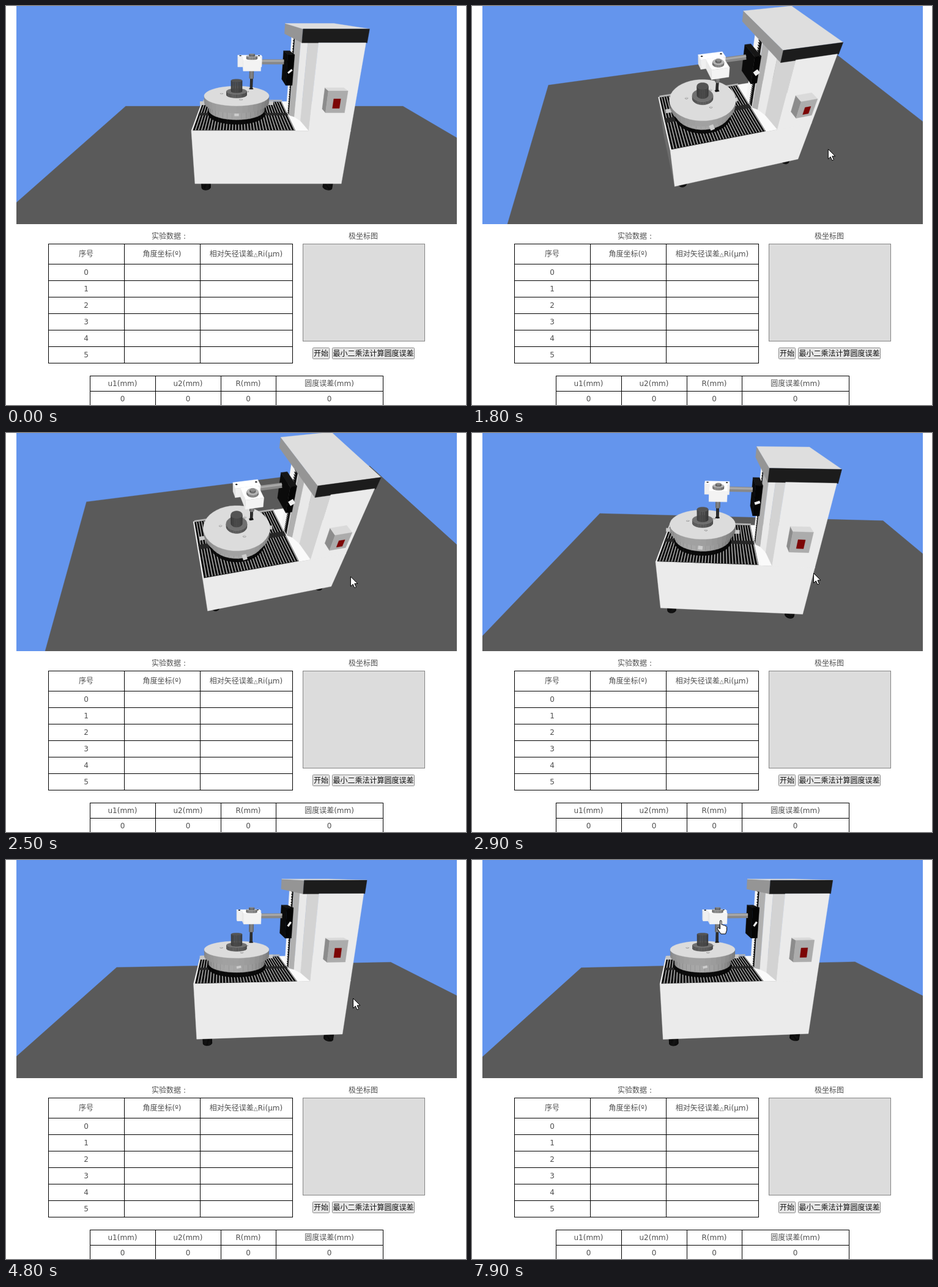
An HTML page with a canvas that plays this animation: 752x653 px, repeating every 8 s.

```html
<!DOCTYPE html>
<html lang="zh">
<head>
<meta charset="utf-8">
<style>
html, body { margin: 0; width: 100%; height: 100%; overflow: hidden; background: #fff; }
canvas { position: absolute; left: 17px; top: 0; }
svg { position: absolute; left: 0; top: 0; font: 12px "DejaVu Sans", "Noto Sans CJK SC", "Noto Sans CJK", sans-serif; text-anchor: middle; }
</style>
</head>
<body>
<svg id="page" width="752" height="653"></svg>
<canvas id="view" width="720" height="357"></canvas>
<script>
// ---------- static page ----------
let svg = '';
const label = (x, y, s, fill = '#505050') => svg += `<text x="${x}" y="${y}" fill="${fill}">${s}</text>`;
const rect = (x, y, w, h, fill, stroke, r = 0) =>
  svg += `<rect x="${x}" y="${y}" width="${w}" height="${h}" rx="${r}" fill="${fill}" stroke="${stroke}"/>`;

// Ruled table: header texts between column lines, then one line of values per row.
function table(xs, y, head, rowHeight, rows) {
  const bottom = y + head + rowHeight * rows.length, right = xs.at(-1);
  const row = (cells, base) => cells.forEach((s, i) => label((xs[i] + xs[i + 1]) / 2 - .5, base, s));
  let d = xs.map(x => `M${x} ${y - .5}V${bottom + .5}`).join('') + `M${xs[0]} ${y}H${right}`;
  rows.forEach((cells, i) => {
    const top = y + head + i * rowHeight;
    d += `M${xs[0]} ${top}H${right}`;
    row(cells, top + rowHeight / 2 + 4);
  });
  svg += `<path d="${d}M${xs[0]} ${bottom}H${right}" stroke="#000" fill="none"/>`;
  return titles => row(titles, y + head / 2 + 4);
}
function button(x, w, s) {
  rect(x, 559.5, w, 18, '#e6e6e6', '#8a8a8a', 1);
  label(x + w / 2, 573, s, '#111');
}
label(266, 381, '实验数据 :');
label(584, 381, '极坐标图');
table([69.5, 193.5, 317.5, 468.5], 389.5, 33, 27, [0, 1, 2, 3, 4, 5].map(n => [n]))(
  ['序号', '角度坐标(º)', '相对矢径误差<tspan font-size="9">△</tspan>Ri(μm)']);
table([137.5, 244.5, 351.5, 441.5, 616.5], 605.5, 25, 25, [[0, 0, 0, 0]])(
  ['u1(mm)', 'u2(mm)', 'R(mm)', '圆度误差(mm)']);
rect(485.5, 389.5, 199, 159, '#dcdcdc', '#858585');
button(501.5, 27, '开始');
button(533.5, 134, '最小二乘法计算圆度误差');
document.getElementById('page').innerHTML = svg;

// ---------- orbit camera ----------
const c = document.getElementById('view').getContext('2d');
const D = 434.6, RAD = Math.PI / 180;
let sa, ca, sp, cp, eye;
function aim(yaw, pitch) {
  sa = Math.sin(yaw * RAD); ca = Math.cos(yaw * RAD);
  sp = Math.sin(pitch * RAD); cp = Math.cos(pitch * RAD);
  eye = [-D * cp * sa, D * sp, D * cp * ca];
}
function project([x, y, z]) {
  const u = x * ca + z * sa, w = z * ca - x * sa;
  const k = D / Math.max(20, D - w * cp - y * sp);
  return [377 + u * k, 177 - (y * cp - w * sp) * k, k];
}
const gray = v => `rgb(${v},${v},${v})`;

// ---------- solids ----------
function poly(pts, fill) {
  c.beginPath();
  pts.forEach(p => { const [x, y] = project(p); c.lineTo(x, y); });
  c.closePath();
  c.fillStyle = c.strokeStyle = fill;
  c.lineWidth = .4;
  c.fill();
  c.stroke();
}
const flat = (x0, x1, z0, z1, y, fill) => poly([[x0, y, z0], [x1, y, z0], [x1, y, z1], [x0, y, z1]], fill);
const wall = (x0, z0, x1, z1, y0, y1, fill) => poly([[x0, y0, z0], [x1, y0, z1], [x1, y1, z1], [x0, y1, z0]], fill);
function box(x0, x1, y0, y1, z0, z1, left, top, front) {
  wall(x0, z0, x0, z1, y0, y1, gray(left));
  flat(x0, x1, z0, z1, y1, gray(top));
  wall(x0, z1, x1, z1, y0, y1, gray(front));
}
function rod(a, b, r, v) {
  const p = project(a), q = project(b);
  c.beginPath();
  c.moveTo(p[0], p[1]);
  c.lineTo(q[0], q[1]);
  c.lineWidth = r * (p[2] + q[2]);
  c.strokeStyle = gray(v);
  c.stroke();
}
function cylinder(x, z, r, y0, y1, side, top) {
  const n = 40, step = 2 * Math.PI / n, ring = [];
  const at = q => [x + r * Math.cos(q), z + r * Math.sin(q)];
  for (let i = 0; i < n; i++) {
    const [ax, az] = at(i * step), [bx, bz] = at((i + 1) * step);
    const nx = Math.cos((i + .5) * step), nz = Math.sin((i + .5) * step);
    ring.push([ax, y1, az]);
    if (nx * (eye[0] - ax) + nz * (eye[2] - az) > 0)
      wall(ax, az, bx, bz, y0, y1, gray(side * (.7 + .3 * Math.max(0, nz - .25 * nx))));
  }
  poly(ring, gray(top));
}

function base() {
  flat(-318, 477, -313, 313, -100, '#5a5a5a');
  for (const x of [-49, 146]) cylinder(x, 50, 7, -107, -90, 14, 10);
  wall(-64, -63.5, -64, 63.5, -90, 0, '#6c6c6c');
  flat(-64, 161, -63.5, 63.5, 0, '#fafafa');
  flat(-62, 83, -62, 62, 0, '#0a0a0a');
  for (let x = -59; x < 82; x += 4.4) flat(x, x + .9, -61, 61, 0, '#c8c8c8');
  flat(-62, 83, -5, 5, 0, '#262626');
  rod([-62, 3, -61], [84, 3, -61], 1.3, 180);
}

function column() {
  wall(85, -22, 85, 5, 0, 121, '#f4f4f4');
  const teeth = [[85, 0, 2], [85, 121, 2]];
  for (let y = 120; y >= 0; y -= 2) teeth.push([85, y, y % 4 ? -3 : -9]);
  poly(teeth, '#111');
  wall(85, 5, 92, 12, 0, 121, '#b0b0b0');
  wall(92, 12, 98, 28, 0, 121, '#e9e9e9');
  wall(98, 28, 102, 63.5, 0, 121, '#d3d3d3');
}

function turntable() {
  cylinder(0, 0, 46, 2, 9, 10, 8);
  cylinder(0, 0, 45, 9, 24, 166, 160);
  for (const s of [-1, 1]) rod([45 * s, 19, 0], [59 * s, 19, 0], 3, 200);
  cylinder(0, 0, 51.3, 22, 33, 160, 220);
  rod([0, 20, 48], [0, 20, 58], 3.2, 205);
  for (let q = 75; q < 360; q += 120)
    cylinder(25 * Math.cos(q * RAD), 25 * Math.sin(q * RAD), 2, 33, 33.5, 160, 200);
  cylinder(0, 0, 16, 33, 39, 90, 112);
  cylinder(0, 0, 8.5, 39, 56.5, 72, 84);
}

function probe() {
  box(76, 86, 50, 97, -34, 5, 11, 22, 5);
  rod([80, 73, 5], [80, 73, 15], 4, 238);
  rod([39, 81, -24], [76, 81, -24], 4, 136);
  rod([39, 82.5, -24], [76, 82.5, -24], 1.6, 168);
  cylinder(23, 0, 1.6, 43, 60, 50, 50);
  cylinder(23, 0, 3, 60, 75, 130, 120);
  flat(20, 26, -2, 2, 43, '#111');
  box(2, 40, 74, 90, -34, -18, 228, 255, 240);
  box(10, 36, 74, 90, -18, 12, 232, 255, 243);
  for (const x of [6, 36]) cylinder(x, -28, 1.2, 90, 90.2, 30, 30);
  cylinder(23, 0, 8, 90, 94, 130, 180);
  cylinder(23, 0, 3.8, 94, 97, 110, 140);
}

function front() {
  box(81, 162, 121, 137.5, -64, 64.5, 149, 222, 28);
  wall(-64, 63.5, 161, 63.5, -90, 0, '#ebebeb');
  wall(102, 63.5, 161, 63.5, -1, 121, '#ebebeb');
  box(117, 142, 33, 63, 63.5, 78, 140, 218, 172);
  wall(124.5, 80, 133.5, 80, 40, 53, '#7c0606');
}

// ---------- pointer ----------
const arrow = new Path2D('M.5.5V16.5L4.3 13 7 19 9.6 17.8 7 12H12Z');
const hand = new Path2D('M5.5 1.5Q7.5 0 8 2V8Q10 7 11 9Q13 8 14 10Q16 9.5 16.5 11.5V17L14.5 23H7L1 14.5Q1 12 3.5 13L5.5 15Z');
function pointer(x, y, shape) {
  c.save();
  c.translate(x, y);
  c.fillStyle = '#fff';
  c.strokeStyle = '#000';
  c.lineWidth = 1;
  c.fill(shape);
  c.stroke(shape);
  c.restore();
}

// ---------- motion ----------
let t = 0;
function ease(from, to) {
  const f = Math.min(1, Math.max(0, (t - from) / (to - from)));
  return f * f * (3 - 2 * f);
}
const yaw = () => 2.9 * ease(700, 1300) + 20.2 * ease(1300, 2200) - 26.6 * ease(2200, 2900)
  + 8.7 * ease(2900, 3700) - 1.8 * ease(3700, 4800) + .5 * ease(6000, 6600);
const pitch = () => 21.7 + 34.2 * ease(1300, 2200) - 25.7 * ease(2200, 2900) - 11 * ease(2900, 3700);
const pointerX = () => 719 - 159 * ease(0, 500) + 29 * ease(700, 1300) - 31 * ease(1300, 2900)
  + 9 * ease(2900, 3700) - 135 * ease(5600, 6000) + 24 * ease(6000, 7500) - 56 * ease(7500, 7900);
const pointerY = () => 56 + 172 * ease(0, 500) + 10 * ease(1300, 2200) - 9 * ease(2200, 2900)
  - 3 * ease(2900, 3700) - 130 * ease(5600, 6000) + 82 * ease(6000, 7500) - 80 * ease(7500, 7900);

function draw(now) {
  t = Math.floor(now % 8000 / 100) * 100;
  aim(yaw(), pitch());
  c.setTransform(1, 0, 0, 1, -17, 0);
  c.fillStyle = '#6495ed';
  c.fillRect(17, 0, 720, 357);
  base();
  column();
  turntable();
  probe();
  front();
  if (t) pointer(pointerX(), pointerY(), t < 7800 ? arrow : hand);
  requestAnimationFrame(draw);
}
requestAnimationFrame(draw);
</script>
</body>
</html>
```
